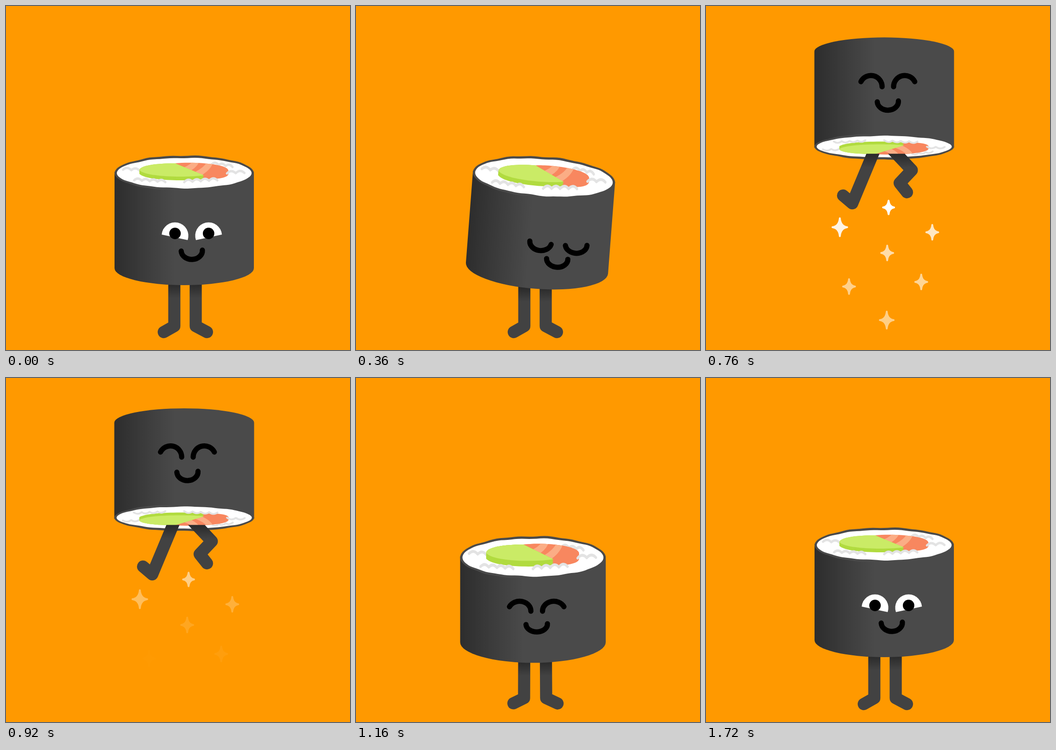
These frames come from a looping animation (748 px wide and 748 px high, 1800 ms). An HTML page with a canvas:

```html
<!DOCTYPE html>
<html lang="en">
<head>
<meta charset="utf-8">
<title>Jumping sushi roll</title>
<style>
html, body { margin: 0; height: 100%; overflow: hidden; background: #f90; }
canvas { display: block; width: 100vw; height: 100vh; }
</style>
</head>
<body>
<canvas width="748" height="748"></canvas>
<script>
const c = document.querySelector('canvas').getContext('2d');
const LOOP = 1800, NORI = '#4a4a4a', FLOOR = 696;

// x, y: middle of the base; top, bottom: height of the end ellipses, negative when seen from below;
// face: x, offset from y, vertical stretch; legs: hip x, ankle x, ankle offset from y, toe offset, knee bend
const STAND = {
  x: 387.5, y: 570, h: 209, rx: 151.5, top: 36, bottom: 37, angle: 0, lift: 0,
  face: [404, -38, 1],
  legs: [[366, 366, 126, -23, 13, 0], [412.5, 412.5, 126, 24.5, 13, 0]]
};
const CROUCH = { ...STAND, x: 393.5, h: 200, rx: 155, top: 43, bottom: 45, angle: 4.4, face: [437.5, -20, .95] };
const LAUNCH = { ...STAND, y: 470, h: 245, rx: 146, top: 8, bottom: 10, face: [405, -70, 1.2] };
const RISE = {
  ...STAND, y: 331, h: 212, rx: 150, top: -24, bottom: -20.5, face: [405.5, -84, 1],
  legs: [[363, 318, 121, -20, -17, 0], [414, 421, 77, 16, 20, 30]]
};
const FLOAT = { ...RISE, y: 306, h: 209, rx: 152, top: -31, bottom: -27, face: [394.5, -102, 1] };
const FALL = {
  ...FLOAT, y: 495, h: 264, rx: 147.3, top: -41, bottom: -35, face: [381, -136.5, 1.5],
  legs: [[365, 352, 150, -30, -24, 0], [414, 449, 135, 25, -15, 0]]
};
const LAND = { ...STAND, x: 384.5, y: 577, h: 184, rx: 159, top: 46, bottom: 46, face: [392, -38, .87] };
const HOP = {
  ...STAND, x: 387, y: 557, h: 208, rx: 152, top: 29, bottom: 35, lift: 17, face: [400.8, -49, 1],
  legs: [[365, 361, 124, -25, -3, 0], [415, 422, 122, 27, 0, 0]]
};

const linear = f => f, easeIn = f => f * f, easeOut = f => 1 - (1 - f) ** 2, smooth = f => f * f * (3 - 2 * f);
const TIMELINE = [
  [0, STAND], [120, STAND, linear], [360, CROUCH, smooth], [440, { ...CROUCH, angle: 2.5 }, linear],
  [480, LAUNCH, linear], [560, RISE, linear], [840, FLOAT, easeOut], [920, FLOAT, linear],
  [1040, FALL, easeIn], [1120, LAND, linear], [1320, { ...HOP, y: 552, lift: 24 }, smooth],
  [1400, HOP, linear], [1640, STAND, easeOut], [LOOP, STAND, linear]];

function mix(a, b, f) {
  if (typeof a === 'number') return a + (b - a) * f;
  if (Array.isArray(a)) return a.map((v, i) => mix(v, b[i], f));
  return Object.fromEntries(Object.keys(a).map(k => [k, mix(a[k], b[k], f)]));
}

function poseAt(t) {
  const i = TIMELINE.findIndex(k => k[0] > t);
  const [t0, from] = TIMELINE[i - 1], [t1, to, ease] = TIMELINE[i];
  return mix(from, to, ease((t - t0) / (t1 - t0)));
}

const clamp = v => Math.max(0, Math.min(1, v));

function fill(path, color) { c.fillStyle = color; c.fill(path); }

function stroke(path, color, width) {
  c.strokeStyle = color;
  c.lineWidth = width;
  c.stroke(path);
}

function at(x, y, draw) {
  c.save();
  c.translate(x, y);
  draw();
  c.restore();
}

function fade(from, to, x0, y0, x1, y1) {
  const g = c.createLinearGradient(x0, y0, x1, y1);
  g.addColorStop(0, from);
  g.addColorStop(1, to);
  return g;
}

const AVOCADO = new Path2D('M-97.5 -4C-97 -14 -60 -19 -20 -19L42.5 7C10 12 -82 12 -97.5 -4Z');
const SALMON = new Path2D('M-20 -19C20 -23 96 -18 96 -3C96 5 75 9 42.5 9Z');
const STRIPES = new Path2D('M26 -23Q20 -12 4 -5M56 -21Q50 -6 26 6');

function extrude(path, from, to, color) {
  for (let y = from; y > to; y--) at(0, y, () => fill(path, color));
  at(0, to, () => fill(path, color));
}

function rice(x, y, count, width, slope) {
  const p = new Path2D();
  p.moveTo(x, y);
  for (let i = 0; i < count; i++) {
    x += width;
    y += slope;
    p.quadraticCurveTo(x - width / 2, y - 9, x, y);
  }
  stroke(p, '#e3e3e3', 5);
}

function wavyDisc(rx, ry, color) {
  const p = new Path2D();
  for (let i = 0; i < 120; i++) {
    const a = i * Math.PI / 60;
    p.lineTo(rx * Math.cos(a), ry * Math.sin(a) * (1 + .014 * Math.sin(9 * a + 1) + .014 * Math.sin(17 * a)));
  }
  fill(p, color);
}

function cutFace(rx, ry, lift) {
  const size = Math.abs(ry), side = Math.sign(ry);
  // the rim leans towards the viewer
  at(0, side * 2.3, () => {
    wavyDisc(rx, ry + side * 2, NORI);
    if (size > 4) wavyDisc(rx - 5, ry - side * 3, '#fff');
  });
  if (size < 6) return;
  c.scale(rx / 151.5, ry / 36);
  const top = -lift * 36 / size;
  rice(-133, -5, 2, 18, 1);
  rice(60, -17, 3, 15, 2);
  extrude(SALMON, 7, top, '#f8875f');
  at(0, top, () => {
    c.clip(SALMON);
    stroke(STRIPES, '#fbad85', 13);
  });
  extrude(AVOCADO, 8, top, '#b1db3f');
  at(0, top, () => fill(AVOCADO, '#caeb66'));
  rice(-109, 18, 4, 17, 1);
  rice(0, 22, 4, 18, -1);
  rice(93, 3, 2, 19, -.5);
}

function roll({ x, y, h, rx, top, bottom, angle, lift }) {
  const above = top > 0, p = new Path2D();
  p.moveTo(-rx, 0);
  p.lineTo(-rx, -h);
  if (!above) p.ellipse(0, -h, rx, -top, 0, Math.PI, 2 * Math.PI);
  p.lineTo(rx, -h);
  p.lineTo(rx, 0);
  if (above) p.ellipse(0, 0, rx, Math.abs(bottom), 0, 0, Math.PI);
  at(x, y, () => {
    c.rotate(angle * Math.PI / 180);
    fill(p, fade('#2d2d2d', NORI, -rx, 0, -rx * .13, 0));
    at(0, above ? -h : 0, () => cutFace(rx, above ? top : bottom, lift));
  });
}

function legs(pose, hipY, shadeY) {
  const shade = fade('#2a2a2a', '#424242', 0, shadeY, 0, shadeY + 30);
  c.save();
  c.beginPath();
  c.rect(0, hipY, 748, 748);
  c.clip();
  for (const [hip, ankleX, drop, toeX, toeY, bend] of pose.legs) {
    const ankleY = Math.min(pose.y + drop, FLOOR);
    const kneeX = (hip + ankleX) / 2 + bend, kneeY = (hipY + ankleY) / 2 + bend / 8;
    const p = new Path2D();
    // start beyond the hip so that the clip cuts the leg level
    p.moveTo(hip * 1.5 - kneeX * .5, hipY * 1.5 - kneeY * .5);
    p.lineTo(kneeX, kneeY);
    p.lineTo(ankleX, ankleY);
    p.lineTo(ankleX + toeX, ankleY + toeY);
    stroke(p, shade, 26.4);
  }
  c.restore();
}

const SMILE = new Path2D('M-23 1A23 19 0 0 0 23 -1');
const HAPPY = new Path2D('M-58.5 -43A24.3 24.3 0 0 1 -12.5 -32');
const CLOSED = new Path2D('M-62 -36A23.5 20 0 0 0 -15.5 -32');
const WHITE = new Path2D('M-65.5 -35A29.1 29.1 0 1 1 -9 -23Z');
const PUPIL = new Path2D();
PUPIL.arc(-36.5, -37.5, 12.5, 0, 7);

// keep an even line while the face is stretched
function line(path) {
  const p = new Path2D();
  p.addPath(path, c.getTransform());
  c.save();
  c.resetTransform();
  stroke(p, '#000', 11.3);
  c.restore();
}

function face({ y, angle, face: [x, offset, stretch] }, t) {
  at(x, y + offset, () => {
    c.rotate(angle * Math.PI / 180);
    c.scale(1 - (stretch - 1) * .1, stretch);
    line(SMILE);
    for (const side of [1, -1]) {
      c.scale(side, 1);
      if (t < 200 || t >= 1240) {
        fill(WHITE, '#fff');
        fill(PUPIL, '#000');
      } else line(t < 480 ? CLOSED : HAPPY);
    }
  });
}

// x, y, size, in order of appearance
const STARS = [[393, 683, 17], [311, 610, 15], [468, 600, 15], [394, 537, 15], [492, 492, 15],
  [291, 481, 18], [397, 438, 14]];

function star([x, y, size], i, t) {
  const age = t - 450 - 4.4 * i * i, grow = clamp(age / 50), alpha = clamp((468 - age) / 300);
  if (!grow || !alpha) return;
  const w = size - 2, h = size * 1.2 - 2, p = new Path2D();
  p.moveTo(0, -h);
  for (const [sx, sy] of [[1, -1], [1, 1], [-1, 1], [-1, -1]]) {
    const end = sx === sy ? [0, sy * h] : [sx * w, 0];
    p.quadraticCurveTo(sx * w * .1, sy * h * .1, ...end);
  }
  const color = `rgb(255 ${153 + 102 * alpha} ${255 * alpha})`;
  at(x, y, () => {
    c.scale(grow, grow);
    fill(p, color);
    stroke(p, color, 4);
  });
}

function draw(t) {
  const pose = poseAt(t), { y, top, bottom } = pose;
  c.fillStyle = '#f90';
  c.fillRect(0, 0, 748, 748);
  c.lineCap = c.lineJoin = 'round';
  STARS.forEach((s, i) => star(s, i, t));
  if (top > 0) {
    legs(pose, y, y + bottom - 2);
    roll(pose);
  } else {
    const hipY = y + Math.abs(bottom) / 2;
    roll(pose);
    legs(pose, hipY, hipY);
  }
  face(pose, t);
}

// the jump runs at 25 pictures a second, the rest at half that rate
function hold(t) {
  return t < 440 || t >= 1160 ? Math.max(0, Math.floor((t - 40) / 80) * 80 + 40) : Math.floor(t / 40) * 40;
}

const start = performance.now();
function tick() {
  draw(hold((performance.now() - start) % LOOP));
  requestAnimationFrame(tick);
}
tick();
</script>
</body>
</html>
```
